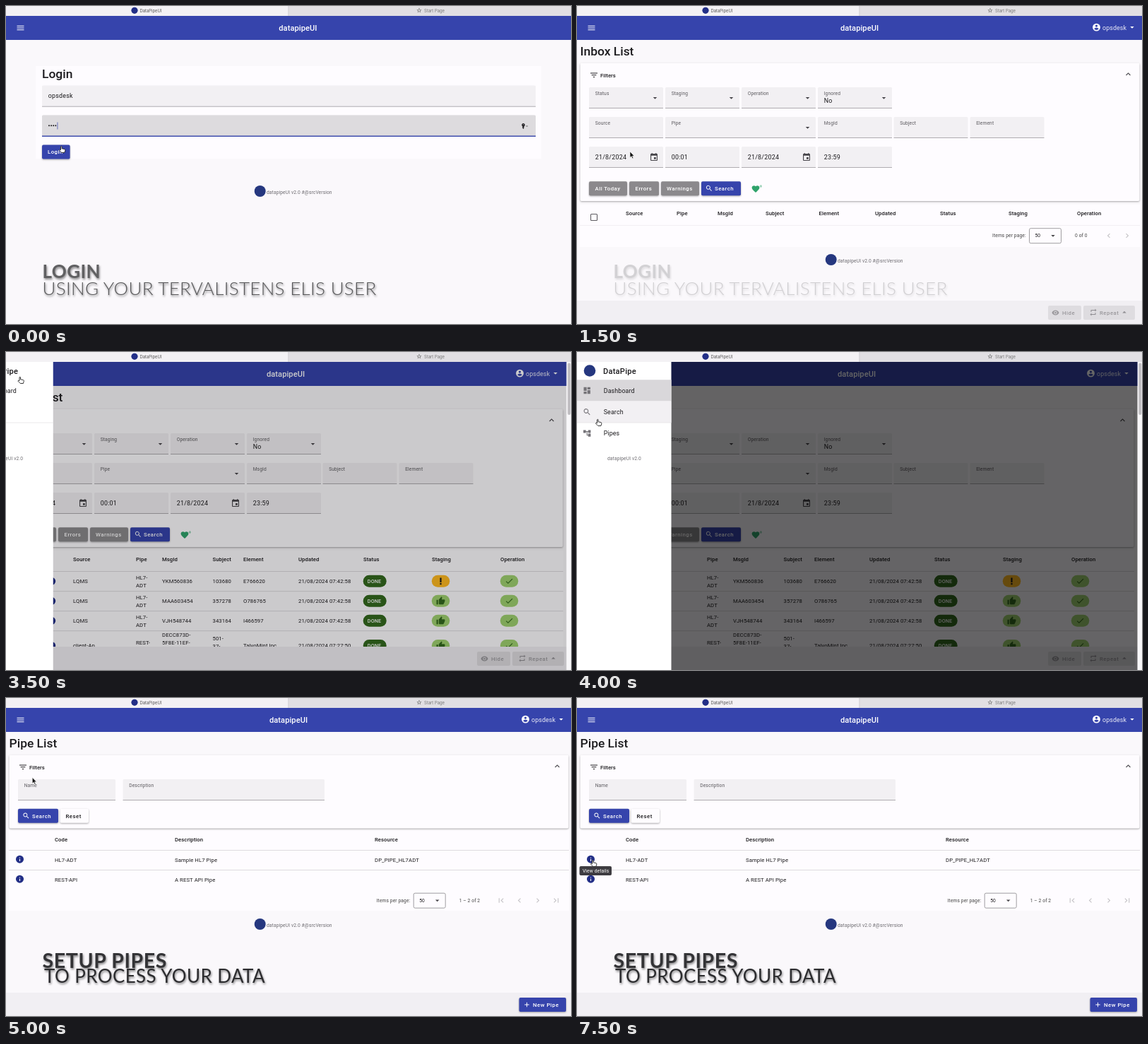
An HTML page that plays this animation: 800x450 px, repeating every 8 s.

```html
<!DOCTYPE html>
<html lang="en">
<head>
<meta charset="utf-8">
<title>datapipeUI tour</title>
<style>
html, body { margin: 0; width: 100%; height: 100%; overflow: hidden; background: #faf8fb; }
svg { display: block; width: 800px; height: 450px; font-family: Roboto, sans-serif; fill-rule: evenodd; }
text { white-space: pre; }
.card { filter: drop-shadow(0 1px 1.2px #0005); }
.title { font-family: Lato, sans-serif; filter: drop-shadow(1px 2px 1.5px #0007); }
</style>
</head>
<body>
<svg id="stage" viewBox="0 0 800 450"></svg>
<script>
const STEP = 500, STEPS = 16;
const BLUE = '#3644ac', NAVY = '#232f87', INK = '#1c1b1e', PANEL = '#fefcff',
      FIELD = '#f2f0f3', GREY = '#8b898c', LINE = '#d6d4d8', LEAF = '#33691e', LIME = '#9fd06f';
const USER = 'opsdesk';

// Icons on a 24 unit grid
const ICON = {
  menu: 'M3 18h18v-2H3zm0-5h18v-2H3zm0-7v2h18V6z',
  filter: 'M10 18h4v-2h-4zM3 6v2h18V6zm3 7h12v-2H6z',
  search: 'M15.5 14h-.79l-.28-.27a6.5 6.5 0 1 0-.7.7l.27.28v.79l5 4.99L20.49 19zm-6 0a4.5 4.5 0 1 1 0-9 4.5 4.5 0 0 1 0 9z',
  up: 'M12 8l-6 6 1.41 1.41L12 10.83l4.59 4.58L18 14z',
  left: 'M15.41 7.41L14 6l-6 6 6 6 1.41-1.41L10.83 12z',
  right: 'M10 6L8.59 7.41 13.17 12l-4.58 4.59L10 18l6-6z',
  first: 'M18.41 16.59L13.82 12l4.59-4.59L17 6l-6 6 6 6zM6 6h2v12H6z',
  last: 'M5.59 7.41L10.18 12l-4.59 4.59L7 18l6-6-6-6zM16 6h2v12h-2z',
  drop: 'M7 10l5 5 5-5z',
  rise: 'M7 14l5-5 5 5z',
  person: 'M12 2a10 10 0 1 0 0 20 10 10 0 0 0 0-20zm0 3a3 3 0 1 1 0 6 3 3 0 0 1 0-6zm0 14.2a7.2 7.2 0 0 1-6-3.22c.03-1.99 4-3.08 6-3.08s5.97 1.09 6 3.08a7.2 7.2 0 0 1-6 3.22z',
  date: 'M17 12h-5v5h5zM16 1v2H8V1H6v2H5a2 2 0 0 0-2 2v14a2 2 0 0 0 2 2h14a2 2 0 0 0 2-2V5a2 2 0 0 0-2-2h-1V1zm3 18H5V8h14z',
  heart: 'M12 21.35l-1.45-1.32C5.4 15.36 2 12.28 2 8.5 2 5.42 4.42 3 7.5 3c1.74 0 3.41.81 4.5 2.09C13.09 3.81 14.76 3 16.5 3 19.58 3 22 5.42 22 8.5c0 3.78-3.4 6.86-8.55 11.54z',
  info: 'M12 2a10 10 0 1 0 0 20 10 10 0 0 0 0-20zm1 15h-2v-6h2zm0-8h-2V7h2z',
  thumb: 'M1 21h4V9H1zm22-11a2 2 0 0 0-2-2h-6.31l.95-4.57.03-.32c0-.41-.17-.79-.44-1.06L14.17 1 7.59 7.59C7.22 7.95 7 8.45 7 9v10a2 2 0 0 0 2 2h9c.83 0 1.54-.5 1.84-1.22l3.02-7.05c.09-.23.14-.47.14-.73z',
  check: 'M9 16.17L4.83 12l-1.42 1.41L9 19 21 7l-1.41-1.41z',
  alert: 'M10 3h4v12h-4zM10 17h4v4h-4z',
  eye: 'M12 4.5C7 4.5 2.73 7.61 1 12a11.8 11.8 0 0 0 22 0c-1.73-4.39-6-7.5-11-7.5zM12 17a5 5 0 1 1 0-10 5 5 0 0 1 0 10zm0-8a3 3 0 1 0 0 6 3 3 0 0 0 0-6z',
  repeat: 'M7 7h10v3l4-4-4-4v3H5v6h2zm10 10H7v-3l-4 4 4 4v-3h12v-6h-2z',
  board: 'M3 13h8V3H3zm0 8h8v-6H3zm10 0h8V11h-8zm0-18v6h8V3z',
  tree: 'M22 11V3h-7v3H9V3H2v8h7V8h2v10h4v3h7v-8h-7v3h-2V8h2v3z',
  plus: 'M19 13h-6v6h-2v-6H5v-2h6V5h2v6h6z',
  star: 'M12 2l3 7 7 .6-5.300 4.800L18.300 21 12 17.300 5.700 21l1.600-6.600L2 9.600 9 9zm0 4.500L10.400 10.500 6.300 10.800 9.400 13.500 8.400 17.500 12 15.300 15.600 17.500 14.600 13.500 17.700 10.800 13.600 10.500z',
  key: 'M12 2a6 6 0 0 0-3 11.200V20l3 3 3-3-2-2 2-2v-2.800A6 6 0 0 0 12 2zm0 3a1.600 1.600 0 1 1 0 3.200 1.600 1.600 0 0 1 0-3.200z'
};

const rect = (x, y, w, h, fill, more = '') =>
  `<rect x="${x}" y="${y}" width="${w}" height="${h}" fill="${fill}" ${more}/>`;
const dot = (x, y, r, fill) => `<circle cx="${x}" cy="${y}" r="${r}" fill="${fill}"/>`;
const text = (x, y, s, size = 7.7, fill = INK, weight = 400, gap = .1, more = '') =>
  `<text x="${x}" y="${y}" font-size="${size}" fill="${fill}" font-weight="${weight}" letter-spacing="${gap}" ${more}>${s}</text>`;
const small = (x, y, s, fill = '#5d5b60') => text(x, y, s, 6.67, fill, 400, .12);
const head = (x, y, s) => text(x, y, s, 7.7, INK, 500, .07);
const icon = (name, cx, cy, fill = INK, size = 13.3) =>
  `<path d="${ICON[name]}" fill="${fill}" transform="translate(${cx - size / 2} ${cy - size / 2}) scale(${size / 24})"/>`;
const rule = (y, w, fill = LINE) => rect(4, y, w, .8, fill);
const box = (x, y) => rect(x - 4.5, y - 4.500, 9, 9, 'none', 'rx="1" stroke="#5f5d62" stroke-width="1.1"');

function field(x, y, w, label, value = '', mark = '') {
  return rect(x, y, w, 30, FIELD, 'rx="1.5"') + rect(x, y + 29.3, w, .7, '#929094') +
    (label ? small(x + 8.7, y + 10.5, label) : '') +
    (value ? text(x + 8.7, y + (label ? 21.800 : 17.500), value, 8.9, INK, 400, .25) : '') +
    (mark ? icon(mark, x + w - (mark === 'date' ? 13 : 11.5), y + 15, '#47454a') : '');
}

function button(x, y, w, label, fill, inset, color = '#fff') {
  return rect(x, y, w, 20, fill, 'rx="2" class="card"') + text(x + inset, y + 12.8, label, 7.8, color, 500, .48);
}

const page = s => s < 3 ? 'login' : s < 10 ? 'inbox' : 'pipes';

function chrome(s) {
  const narrow = s > 3 && s < 10, shift = narrow ? -8 : 0;
  let out = rect(0, 0, 400, 14, '#f3f1f4') + rect(400, 0, 400, 14, '#e1dfe3') + rect(399.5, 0, .8, 14, '#c9c7cb') +
    dot(182, 6.3, 4.6, NAVY) + text(189.500, 8.800, 'DataPipeUI', 5.9, '#555', 400, 0, 'font-family="Inter, sans-serif"') +
    icon('star', 585, 6, '#777', 8.5) + text(592, 8.800, 'Start Page', 5.9, '#777', 400, 0, 'font-family="Inter, sans-serif"') +
    rect(0, 14, 800, 34, BLUE) + icon('menu', 20.500, 31, '#fff');
  const x = s < 3 ? 386.3 : 373 + shift / 2;
  out += text(x, 34.800, 'datapipeUI', 11.1, '#fff', 500, .05);
  if (s > 2) out += icon('person', 735.5 + shift, 30.2, '#fff', 13) +
    text(744 + shift, 33.6, USER, 8.9, '#e9e9f6', 400, .1) + icon('drop', 786 + shift, 30, '#fff');
  return out;
}

const footer = y => dot(359.700, y, 8, '#25377f') + small(369, y + 4.300, 'datapipeUI v2.0 #@srcVersion', '#6d6b70');
const bar = rect(0, 417, 800, 33, '#f1eff3');

function login(s) {
  const focus = s === 0;
  return rect(42, 85, 716, 131, PANEL) + text(51, 102, 'Login', 17.4, INK, 500, 0) +
    field(51, 112.500, 699, '', USER) + field(51, 154.500, 699, '') +
    (focus ? rect(51, 154.500, 699, 30, '#dddbde', 'rx="1.5"') + rect(51, 183.5, 699, 1.4, BLUE) +
      rect(72.600, 164.5, .7, 10, BLUE) + icon('key', 732.5, 169.8, INK, 9) + rect(736, 169.6, 3, .8, '#555') : '') +
    [0, 1, 2, 3].map(i => dot(61 + i * 3.1, 169.3, 1, INK)).join('') +
    button(51, 196.5, 39.6, 'Login', BLUE, 8) + footer(262);
}

function pager(x, y, count, icons) {
  return small(x, y + 2.200, 'Items per page:', '#444') +
    rect(x + 52.5, y - 10.3, 45, 21, PANEL, 'rx="2" stroke="#88868a" stroke-width=".8"') +
    small(x + 60.500, y + 2.300, '50', INK) + icon('drop', x + 86, y, '#47454a') + small(x + 117, y + 2.200, count, '#444') +
    icons.map((n, i) => icon(n, 779 - 26 * (icons.length - 1 - i), y, '#c4c2c6')).join('');
}

const COLS = [95, 184, 221, 292.500, 336, 414, 506, 603, 700];
const NAMES = ['Source', 'Pipe', 'MsgId', 'Subject', 'Element', 'Updated', 'Status', 'Staging', 'Operation'];
const ROWS = [
  ['YKM560836', '103680', 'E766620'],
  ['MAA603454', '357278', 'O786765'],
  ['VJH548744', '343164', 'I466597']
];

function chips(y, warn) {
  const pill = (x, w, fill) => rect(x, y - 8.5, w, 17, fill, 'rx="8.5"');
  return pill(505.700, 33, LEAF) + text(511.8, y + 2.600, 'DONE', 7.2, '#fff', 500, .15) +
    pill(602.8, 25.5, warn ? '#ffb920' : LIME) + icon(warn ? 'alert' : 'thumb', 615.5, y, warn ? INK : LEAF, 13) +
    pill(699.8, 25.5, LIME) + icon('check', 712.5, y, LEAF, 13);
}

function messages() {
  let out = rect(4, 281, 785, 136, PANEL) + box(24, 299) + rule(310, 785);
  out += NAMES.map((n, i) => head(COLS[i], 296, n)).join('');
  ROWS.forEach(([id, subject, element], i) => {
    const y = 324.300 + i * 28;
    out += box(24, y) + icon('info', 64.700, y, NAVY) + text(95, y + 2.700, 'LQMS') +
      text(184, y - 2.500, 'HL7-') + text(184, y + 8.500, 'ADT') + text(221, y + 2.700, id) +
      text(292.500, y + 2.700, subject) + text(336, y + 2.700, element) +
      text(414, y + 2.700, '21/08/2024 07:42:58') + chips(y, i === 0) + rule(y + 14, 785);
  });
  return out + box(24, 415.5) + icon('info', 64.700, 415.5, NAVY) + text(95, 418, 'client-Ap') + text(184, 413.500, 'REST-') +
    text(221, 403, 'DECC873D-') + text(221, 413.500, '5F8E-11EF-') + text(292.500, 408, '501-') + text(292.500, 418.500, '37-') +
    text(336, 418, 'TalvoMint Inc') + text(414, 418, '21/08/2024 07:27:50') + chips(415.5, false);
}

function filters(title, w, h) {
  return text(4.6, 70, title, 17.4, INK, 500, 0) + rect(4.500, 80.5, w, h, PANEL, 'rx="2" class="card"') +
    icon('filter', 24, 97.700) + text(33, 100.5, 'Filters', 7.7, INK, 500, .05) + icon('up', w - 11.500, 96.5, '#47454a');
}

function inbox(s) {
  const loaded = s > 3, w = loaded ? 784 : 792;
  let out = loaded ? messages() : rect(4, 281, 793, 60, PANEL) + rule(310, 793, '#efedf1') + box(24, 299) +
    [69, 141, 199, 267, 342.5, 422, 514, 611, 708].map((x, i) => head(x, 296, NAMES[i])).join('') +
    pager(588, 325, '0 of 0', ['left', 'right']) + footer(359);
  out += filters('Inbox List', w, 195.5) +
    field(17, 115, 105, 'Status', '', 'drop') + field(125, 115, 105, 'Staging', '', 'drop') +
    field(233, 115, 105, 'Operation', '', 'drop') + field(341, 115, 105, 'Ignored', 'No', 'drop') +
    field(17, 157, 105, 'Source') + field(125, 157, 213, 'Pipe', '', 'drop') + field(341, 157, 105, 'MsgId') +
    field(448.5, 157, 105, 'Subject') + field(556.5, 157, 105, 'Element') +
    field(17, 199, 105, '', '21/8/2024', 'date') + field(125, 199, 105, '', '00:01') +
    field(233, 199, 105, '', '21/8/2024', 'date') + field(341, 199, 105, '', '23:59') +
    button(17, 248.2, 54, 'All Today', GREY, 8.5) + button(74, 248.2, 42, 'Errors', GREY, 8.5) +
    button(119, 248.2, 54, 'Warnings', GREY, 8) + button(176, 248.2, 56, 'Search', BLUE, 19) +
    icon('search', 187, 258, '#fff', 11) + icon('heart', 253, 259, '#2fa36b', 13) + icon('plus', 260.200, 255, '#2fa36b', 6.5);
  out += bar + rect(667, 424, 47, 20, '#dedce0', 'rx="2"') + icon('eye', 677.5, 434, '#9a989c', 11) +
    text(687, 436.800, 'Hide', 7.8, '#9a989c', 500, .48) + rect(717, 424, 73, 20, '#dedce0', 'rx="2"') +
    icon('repeat', 731, 433.500, '#8f8d92', 12) + text(740, 436.800, 'Repeat', 7.8, '#9a989c', 500, .48) + icon('rise', 775, 433.500, '#8f8d92');
  if (loaded) out += rect(793.5, 14, 6.500, 436, '#f8f7f9') + rect(795.3, 15.5, 4, 73.500, '#bfbdc1', 'rx="2"');
  return out;
}

function drawer(s) {
  const open = Math.min(1, (s - 6) / 2), full = open === 1;
  const items = [['Dashboard', 'board', '#d9d7da'], ['Search', 'search', s === 8 && FIELD], ['Pipes', 'tree', s === 9 && FIELD]];
  const rows = items.map(([name, pic, tint], i) => {
    const y = 54.5 + i * 30.300;
    return (full && tint ? rect(0, y - 15.2, 133.5, 30.300, tint) : '') +
      icon(pic, 14.2, y, '#757378', 12.5) + text(37.700, y + 3, name, 8.9, INK, 400, .12);
  }).join('');
  return rect(0, 14, 793.5, 436, '#000', `opacity="${full ? .6 : .2}"`) +
    `<g transform="translate(${-133.5 * (1 - open)})">` + rect(0, 14, 133.5, 436, '#fff') +
    dot(18, 26.5, 8.3, '#25377f') + text(37, 30.700, 'DataPipe', 11.1, INK, 500, .22) +
    rows + rect(0, 99.700, 133.5, .6, '#dddbdf') + small(43, 153.2, 'datapipeUI v2.0', '#6d6b70') + '</g>';
}

function pipes(s) {
  const row = (y, ...cells) => icon('info', 19.5, y - 1.300, NAVY) + cells.map((c, i) => text([69, 239, 522][i], y + 2.7, c)).join('');
  return rect(4, 186, 793, 115, PANEL) + filters('Pipe List', 792, 104) +
    field(17, 115, 138, 'Name') + field(165.5, 115, 285.5, 'Description') +
    button(17, 156.700, 57, 'Search', BLUE, 20) + icon('search', 28.5, 166.6, '#fff', 11) +
    button(76.5, 156.700, 40.5, 'Reset', PANEL, 8, INK) +
    head(69, 202.700, 'Code') + head(239, 202.700, 'Description') + head(522, 202.700, 'Resource') +
    rule(215, 793) + row(229.500, 'HL7-ADT', 'Sample HL7 Pipe', 'DP_PIPE_HL7ADT') +
    rule(243, 793) + row(257.500, 'REST-API', 'A REST API Pipe') +
    pager(524.700, 286.500, '1 – 2 of 2', ['first', 'left', 'right', 'last']) + footer(320) +
    bar + button(726.5, 424, 66.500, 'New Pipe', BLUE, 19.5) + icon('plus', 737.5, 434, '#fff', 11) +
    (s > 12 ? rect(3.5, 238, 45.5, 13, '#3e3c41', 'rx="2"') + small(8, 246.800, 'View details', '#fff') : '');
}

function title(s) {
  const line = (y, words, size, weight, gap, fill) => text(51.5, y, words, size, fill, weight, gap);
  if (s < 4) return `<g class="title" opacity="${s < 3 ? 1 : .25}">` +
    line(385, 'LOGIN', 26, 700, .4, '#606062') + line(409, 'USING YOUR TERVALISTENS ELIS USER', 26, 300, .3, '#58585a') + '</g>';
  if (s < 10) return '';
  return '<g class="title">' + line(382.3, 'SETUP PIPES', 28.5, 700, .6, '#333336') +
    text(54, 402.700, 'TO PROCESS YOUR DATA', 26, '#2c2c2f', 400, .4) + '</g>';
}

// Pointer stops: step, x, y
const STOPS = [[0, 76.5, 198], [2, 76.5, 198], [3, 75, 206], [6, 19, 48], [7, 18, 35], [8, 27.5, 95], [9, 37, 112], [11, 37.500, 113], [13, 20.5, 229], [16, 20.5, 229]];

function pointer(s) {
  const i = STOPS.findIndex(p => p[0] > s), [a, ax, ay] = STOPS[i - 1], [b, bx, by] = STOPS[i];
  const k = (s - a) / (b - a), hand = s < 3 || (s > 6 && s < 10) || s > 12;
  const shape = hand
    ? 'M1 .8Q1.800 -.2 2.600.8V3.800L6.500 4.600Q7.500 5 7.300 6.300L6.400 9.500H2.300L-.9 6.300Q-1 5 .2 5.200L1 5.800Z'
    : 'M0 0V8.500L2 6.700 3.400 9.800 4.800 9.200 3.400 6.200H6Z';
  return `<path d="${shape}" transform="translate(${ax + (bx - ax) * k} ${ay + (by - ay) * k})" ` +
    (hand ? 'fill="#fff" stroke="#222" stroke-width=".9"/>' : 'fill="#111" stroke="#fff" stroke-width=".6"/>');
}

const PAGES = { login, inbox, pipes };
const stage = document.getElementById('stage');
let shown = -1;

function draw(s) {
  stage.innerHTML = rect(0, 0, 800, 450, '#faf8fb') + chrome(s) + PAGES[page(s)](s) +
    (s > 6 && s < 10 ? drawer(s) : '') + title(s) + pointer(s);
}

const start = performance.now();
function tick() {
  const s = Math.floor(Math.max(0, performance.now() - start) / STEP) % STEPS;
  if (s !== shown) draw(shown = s);
  requestAnimationFrame(tick);
}
tick();
</script>
</body>
</html>
```
